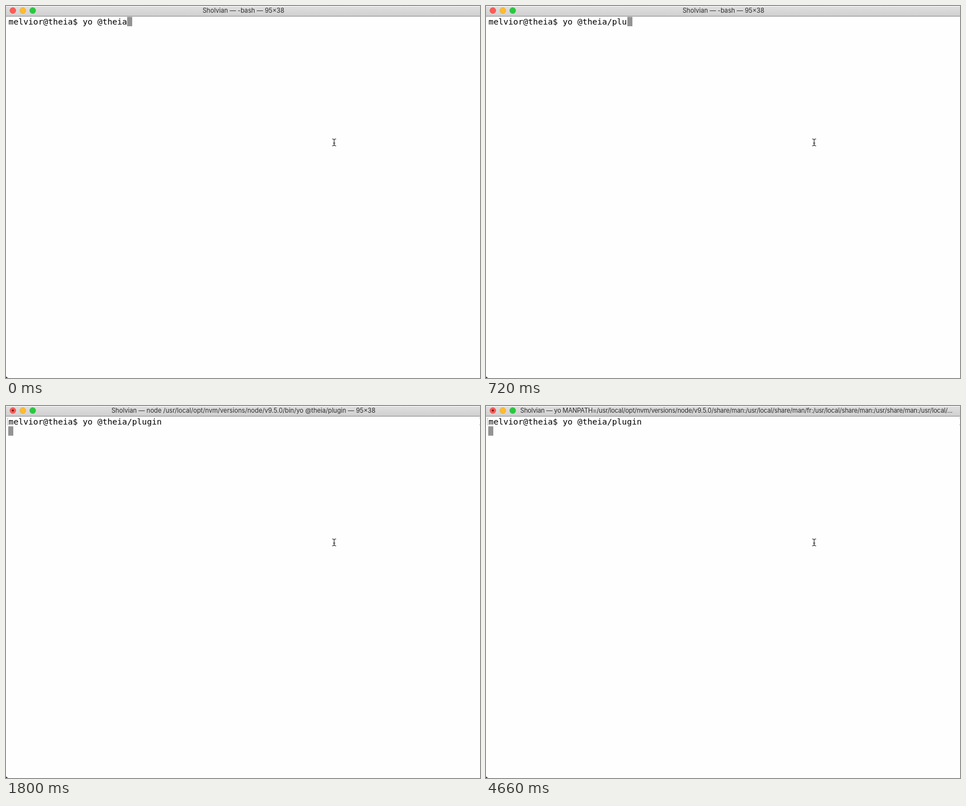
Write an HTML page that moves like this. It is 845x662 px and loops after 8 s.

```html
<!DOCTYPE html>
<html lang="en">
<head>
<meta charset="utf-8">
<title>Shell session</title>
<style>
  html, body { margin: 0; width: 100%; height: 100%; overflow: hidden; background: #fefefe; }
  svg { display: block; }
  text { white-space: pre; }
  #title { font: 11.2px Inter, "DejaVu Sans", sans-serif; fill: #2c2c2c; }
  #title.truncated { letter-spacing: -.21px; }
  #command { font: 14.63px "DejaVu Sans Mono", monospace; fill: #000; }
</style>
</head>
<body>
<svg width="845" height="662" viewBox="0 0 845 662">
  <defs>
    <linearGradient id="bar" x2="0" y2="1">
      <stop offset="0" stop-color="#dedede"/>
      <stop offset="1" stop-color="#d0d0d0"/>
    </linearGradient>
  </defs>
  <rect width="845" height="662" fill="#fefefe"/>
  <rect y="1" width="845" height="17" fill="url(#bar)"/>
  <rect y="17.6" width="845" height="1.2" fill="#939393"/>

  <g stroke-width=".6">
    <circle cx="12.2" cy="8" r="5.3" fill="#fc5b57" stroke="#e2453f"/>
    <circle cx="30" cy="8" r="5.3" fill="#fdbc2f" stroke="#dfa023"/>
    <circle cx="47.6" cy="8" r="5.3" fill="#28c93f" stroke="#1dad2c"/>
  </g>
  <circle id="busyDot" cx="12.2" cy="8" r="1.8" fill="#6d0604"/>
  <text id="title" y="12.3"></text>

  <path id="marks" d="M4.5 21.5H2.5V33.5H4.5M843.5 21.5H845M843.5 33.5H845" fill="none" stroke="#bdbdbd"/>
  <rect id="cursor" width="9" height="16.6" fill="#939393"/>
  <text id="command" x="4.6" y="33"></text>

  <!-- mouse pointer -->
  <path d="M581.5 236.5Q585 236.5 585 239V246.5Q585 249 581.5 249M588.5 236.5Q585 236.5 585 239M585 246.5Q585 249 588.5 249M583 244H587"
        fill="none" stroke="#222" stroke-width="1.1"/>
  <path d="M0 659Q1 661 4 662H0Z" fill="#222"/>
</svg>
<script>
  const LOOP = 8000, KEY_INTERVAL = 180, ENTER = 1620;
  const CHAR_WIDTH = 8.806, TEXT_LEFT = 5;
  const PROMPT = "melvior@theia$ yo @theia", TYPED = "/plugin";
  const APP = "Sholvian — ";
  const MAN = "yo MANPATH=/usr/local/opt/nvm/versions/node/v9.5.0/share/man:/usr/local/share/man/fr:/usr/local/share/man:/usr/share/man:/us";

  const titles = [
    { start: 0, text: "-bash — 95×38" },
    { start: 1800, text: "node /usr/local/opt/nvm/versions/node/v9.5.0/bin/yo @theia/plugin — 95×38" },
    { start: 3770, text: `node ◂ ${MAN}...`, truncated: true },
    { start: 4310, text: `npm ◂ ${MAN}r...`, truncated: true },
    { start: 4660, text: `${MAN}r/local/...`, truncated: true },
  ];

  const [title, command, cursor, marks, busyDot] =
    ["title", "command", "cursor", "marks", "busyDot"].map(id => document.getElementById(id));

  function setAttributes(element, attributes) {
    for (const name in attributes) element.setAttribute(name, attributes[name]);
  }

  function show(element, visible) {
    element.setAttribute("visibility", visible ? "visible" : "hidden");
  }

  function draw(time) {
    const line = PROMPT + TYPED.slice(0, Math.floor(time / KEY_INTERVAL));
    const entered = time >= ENTER;
    command.textContent = line;
    setAttributes(cursor, {
      x: entered ? 4 : Math.round(TEXT_LEFT + line.length * CHAR_WIDTH),
      y: entered ? 36.2 : 19.4,
    });
    show(marks, entered);
    show(busyDot, time >= titles[1].start);

    const current = titles.findLast(entry => time >= entry.start);
    title.textContent = APP + current.text;
    title.classList.toggle("truncated", !!current.truncated);
    setAttributes(title, {
      x: current.truncated ? 61 : 423.3,
      "text-anchor": current.truncated ? "start" : "middle",
    });
  }

  const startTime = performance.now();
  function tick() {
    draw((performance.now() - startTime) % LOOP);
    requestAnimationFrame(tick);
  }
  tick();
</script>
</body>
</html>
```
